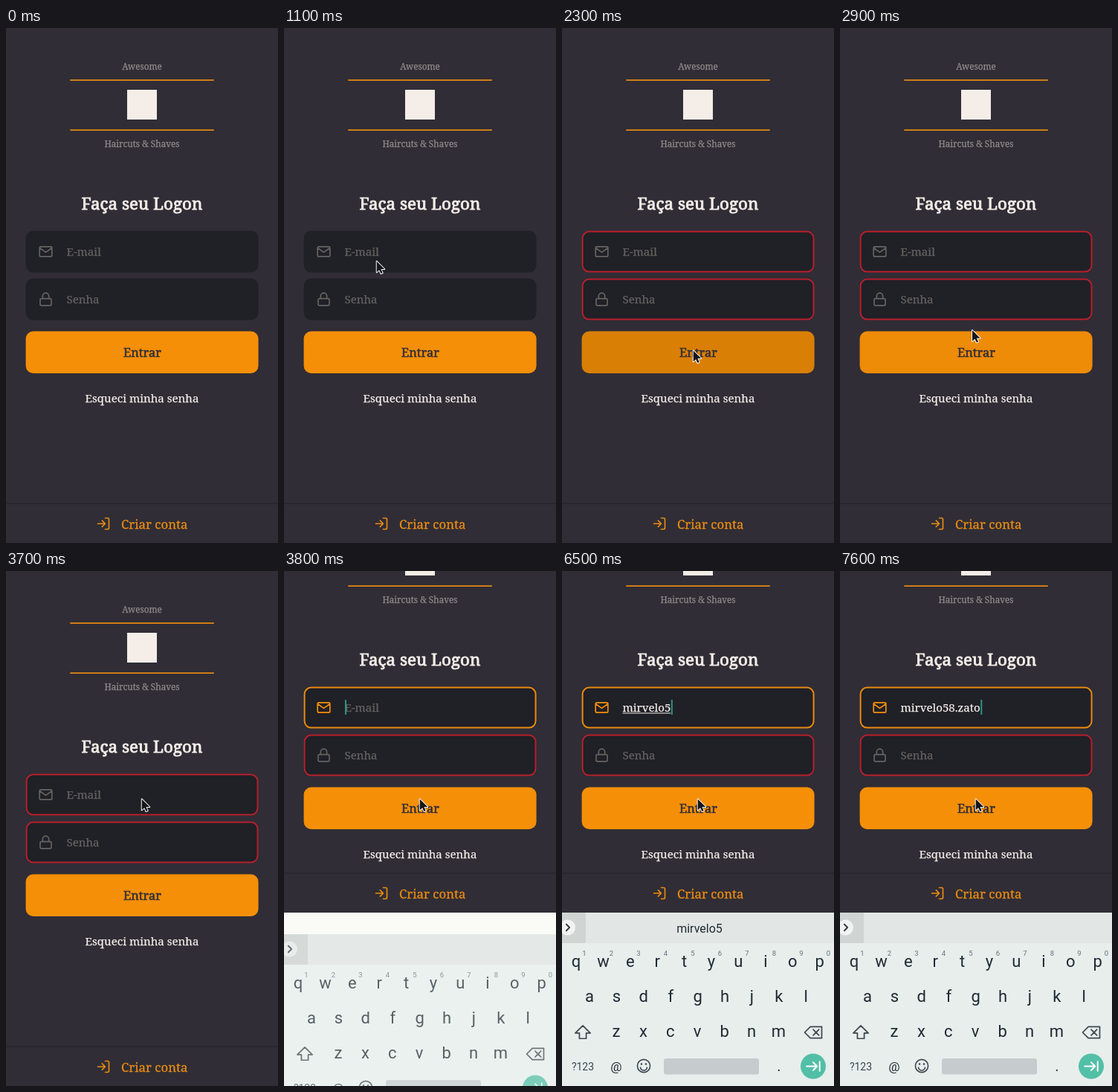
Animation of 366 by 692 pixels, one loop 8000 ms. Source, as an HTML page with a canvas:

```html
<!DOCTYPE html>
<html lang="pt-BR">
<head>
<meta charset="utf-8">
<title>Logon</title>
<style>
html, body { margin: 0; width: 100%; height: 100%; overflow: hidden; background: #302d36; }
canvas { display: block; width: 366px; height: 692px; }
</style>
</head>
<body>
<canvas id="stage"></canvas>
<script>
const W = 366, H = 692, LOOP = 8000, STEP = 100;
const SERIF = '"Roboto Slab", "Noto Serif", serif';
const SANS = 'Roboto, "Open Sans", sans-serif';
const BG = '#302d36', FIELD = '#202027', ORANGE = '#f58f07', AMBER = '#ea8c10';
const RED = '#b8202c', GREY = '#666360', LIGHT = '#f4ede8', TEAL = '#2c9485';
const KEY = '#1f2a33';

const KEYBOARD_AT = 3800, ERROR_AT = 2200;
const CONTENT_SHIFT = -117, FOOTER_SHIFT = -233;
const LEFT = 26.6, WIDE = 313, TALL = 56;

const LOGIN = 'mirvelo58.zato';
// [time, number of letters typed]
const TYPING = [[5300, 1], [5400, 2], [5600, 3], [5700, 4], [5800, 5], [5900, 7],
  [6500, 8], [6800, 9], [7000, 10], [7300, 11], [7500, 13], [7600, 14]];
// [time, x, y]
const POINTER = [[500, 15, 270], [1100, 124, 312], [1300, 153, 361],
  [1800, 176, 432], [2600, 176, 432], [3600, 182, 305]];

const ICONS = {
  mail: 'M4 4h16a2 2 0 0 1 2 2v12a2 2 0 0 1-2 2H4a2 2 0 0 1-2-2V6a2 2 0 0 1 2-2zM22 6l-10 7L2 6',
  lock: 'M5 11h14a2 2 0 0 1 2 2v7a2 2 0 0 1-2 2H5a2 2 0 0 1-2-2v-7a2 2 0 0 1 2-2zM7 11V7a5 5 0 0 1 10 0v4',
  enter: 'M15 3h4a2 2 0 0 1 2 2v14a2 2 0 0 1-2 2h-4M10 17l5-5-5-5M15 12H3',
  shift: 'M12 2L1 13h6v8h10v-8h6z',
  erase: 'M8 4h16v16H8L0 12zM12 8l8 8M20 8l-8 8',
  next: 'M2 12h15M12 6l6 6-6 6M22 5v14',
  chevron: 'M9 6l6 6-6 6',
  arrow: 'M0 0V17L4 13.4 6.6 19 9.2 17.9 6.7 12.2H12.2Z'
};
for (const name in ICONS) ICONS[name] = new Path2D(ICONS[name]);

const canvas = document.getElementById('stage');
const c = canvas.getContext('2d');
const dpr = window.devicePixelRatio || 1;
canvas.width = W * dpr;
canvas.height = H * dpr;

const clamp = v => Math.max(0, Math.min(1, v));
const span = (t, from, to) => clamp((t - from) / (to - from));
const smooth = p => p * p * (3 - 2 * p);

function rect(x, y, w, h, color) {
  c.fillStyle = color;
  c.fillRect(x, y, w, h);
}

function box(x, y, w, h, r) {
  c.beginPath();
  c.roundRect(x, y, w, h, r);
}

function disc(x, y, r, color) {
  c.beginPath();
  c.arc(x, y, r, 0, 2 * Math.PI);
  c.fillStyle = color;
  c.fill();
}

function text(str, x, y, font, color, align = 'center') {
  c.font = font;
  c.fillStyle = color;
  c.textAlign = align;
  c.fillText(str, x, y);
}

// Serif text with a thin outline for weights between regular and bold.
function slab(str, x, y, size, color, align = 'center', weight = 0.25) {
  text(str, x, y, size + 'px ' + SERIF, color, align);
  c.lineWidth = weight;
  c.lineJoin = 'round';
  c.strokeStyle = color;
  c.strokeText(str, x, y);
}

function icon(name, cx, cy, size, color, weight = 2) {
  c.save();
  c.translate(cx - size / 2, cy - size / 2);
  c.scale(size / 24, size / 24);
  c.lineWidth = weight;
  c.lineCap = c.lineJoin = 'round';
  c.strokeStyle = color;
  c.stroke(ICONS[name]);
  c.restore();
}

function field(y, name, border, iconColor) {
  box(LEFT, y, WIDE, TALL, 10);
  c.fillStyle = FIELD;
  c.fill();
  if (border) {
    box(LEFT + 1, y + 1, WIDE - 2, TALL - 2, 9);
    c.lineWidth = 2;
    c.strokeStyle = border;
    c.stroke();
  }
  icon(name, 53.5, y + 27.9, 20, iconColor);
}

function header() {
  slab('Awesome', 183, 56, 11.7, '#8f8a8b');
  rect(86.3, 69.2, 193.5, 1.7, AMBER);
  rect(163, 83, 40, 40, LIGHT);
  rect(86.3, 136.3, 193.5, 1.7, AMBER);
  slab('Haircuts & Shaves', 183, 160, 11.7, '#8f8a8b');
  slab('Faça seu Logon', 183, 244, 22.4, LIGHT, 'center', 0.9);
}

function typedCount(t) {
  let n = 0;
  for (const [at, count] of TYPING) if (t >= at) n = count;
  return n;
}

function emailText(t, focused) {
  const typed = LOGIN.slice(0, typedCount(t));
  slab(typed || 'E-mail', 81.5, 306, 15.1, typed ? LIGHT : GREY, 'left');
  if (!focused) return;
  const width = typed ? c.measureText(typed).width : 0;
  if (typed && t < 7000) rect(81.5, 307.5, width, 1, LIGHT);
  if (t < 4200 || t >= 4700) rect(82 + width, 290, 2, 20, TEAL);
}

function button(t) {
  c.save();
  box(LEFT, 407.6, WIDE, TALL + 0.4, 10);
  c.fillStyle = ORANGE;
  c.fill();
  if (t >= 2000 && t < 3000) {
    c.clip();
    c.globalAlpha = 0.115 * (1 - span(t, 2600, 3000));
    disc(176, 436, 30 + 140 * span(t, 2000, 2300), '#000');
  }
  c.restore();
  slab('Entrar', 183.5, 442, 16.4, '#312e38', 'center', 0.6);
}

function form(t, focused) {
  const error = t >= ERROR_AT ? RED : null;
  header();
  field(272.6, 'mail', focused ? AMBER : error, focused ? ORANGE : GREY);
  emailText(t, focused);
  field(336.6, 'lock', error, GREY);
  slab('Senha', 81.5, 370, 15.1, GREY, 'left');
  button(t);
  slab('Esqueci minha senha', 183, 503, 15.1, LIGHT);
}

function footer() {
  rect(0, 638, W, 54, BG);
  rect(0, 638.5, W, 1, '#232129');
  icon('enter', 131, 666, 20, AMBER);
  slab('Criar conta', 155, 672.5, 16.8, AMBER, 'left', 0.3);
}

function keyRow(letters, x, y) {
  [...letters].forEach((ch, i) => text(ch, x + i * 36.4, y, '22px ' + SANS, KEY));
}

function smiley(x, y) {
  c.lineWidth = 1.6;
  c.strokeStyle = '#3c474f';
  c.beginPath();
  c.arc(x, y, 8.6, 0, 2 * Math.PI);
  c.moveTo(x + 4.5, y + 1.5);
  c.arc(x, y + 1.5, 4.5, 0, Math.PI);
  c.stroke();
  disc(x - 3, y - 2.5, 1.3, '#3c474f');
  disc(x + 3, y - 2.5, 1.3, '#3c474f');
}

function keyboard(t) {
  const p = span(t, KEYBOARD_AT, 4000);
  rect(0, 459, W, 233, '#fafbf6');
  c.save();
  c.globalAlpha = 0.72 + 0.28 * p;
  c.translate(0, 29 * (1 - p) ** 2);

  rect(0, 459, W, 233, '#e7eeec');
  rect(0, 459, W, 41, '#e2e7e5');
  rect(0, 459, 32, 41, '#d0d5d3');
  disc(7.5, 479, 10.5, '#f1f3f2');
  icon('chevron', 8, 479, 17, '#30383d', 2.6);
  if (t >= 5400 && t < 7000) {
    text(LOGIN.slice(0, typedCount(t)), 185, 486, '16px ' + SANS, KEY);
  }

  keyRow('qwertyuiop', 19, 531.5);
  [...'1234567890'].forEach((d, i) =>
    text(d, 30 + i * 36.5, 516.5, '9.5px ' + SANS, '#66727a'));
  keyRow('asdfghjkl', 37, 579);
  keyRow('zxcvbnm', 73, 626);
  icon('shift', 28, 620, 22, '#3c474f', 1.9);
  icon('erase', 338, 620, 23, '#3c474f', 1.8);

  text('?123', 28, 671, '14px ' + SANS, '#3c474f');
  text('@', 73, 671.5, '17px ' + SANS, KEY);
  smiley(110, 665);
  box(137, 655, 128, 21.5, 3);
  c.fillStyle = '#c6cbce';
  c.fill();
  text('.', 292, 672, '20px ' + SANS, KEY);
  disc(338, 665.5, 17, '#52bfa7');
  icon('next', 338, 665.5, 21, '#fff', 2.3);
  c.restore();
}

function pointer(t) {
  if (t < POINTER[0][0]) return;
  let i = 0;
  while (i < POINTER.length - 2 && t >= POINTER[i + 1][0]) i++;
  const [t0, x0, y0] = POINTER[i], [t1, x1, y1] = POINTER[i + 1];
  let p = span(t, t0, t1);
  if (t0 === 1300) p = 1 - (1 - p) ** 2;
  if (t0 >= 1800) p = smooth(p);
  c.save();
  c.translate(x0 + (x1 - x0) * p + 0.7, y0 + (y1 - y0) * p + 1.5);
  c.scale(0.87, 0.87);
  c.lineWidth = 2.2;
  c.lineJoin = 'round';
  c.strokeStyle = '#fff';
  c.stroke(ICONS.arrow);
  c.fillStyle = '#17161a';
  c.fill(ICONS.arrow);
  c.restore();
}

function draw(t) {
  const focused = t >= KEYBOARD_AT;
  c.setTransform(dpr, 0, 0, dpr, 0, 0);
  rect(0, 0, W, H, BG);
  c.save();
  if (focused) c.translate(0, CONTENT_SHIFT);
  form(t, focused);
  c.restore();
  c.save();
  if (focused) c.translate(0, FOOTER_SHIFT);
  footer();
  c.restore();
  if (focused) keyboard(t);
  pointer(t);
}

const start = performance.now();
function frame() {
  const t = (performance.now() - start) % LOOP;
  draw(Math.floor(t / STEP) * STEP);
  requestAnimationFrame(frame);
}
frame();
</script>
</body>
</html>
```
